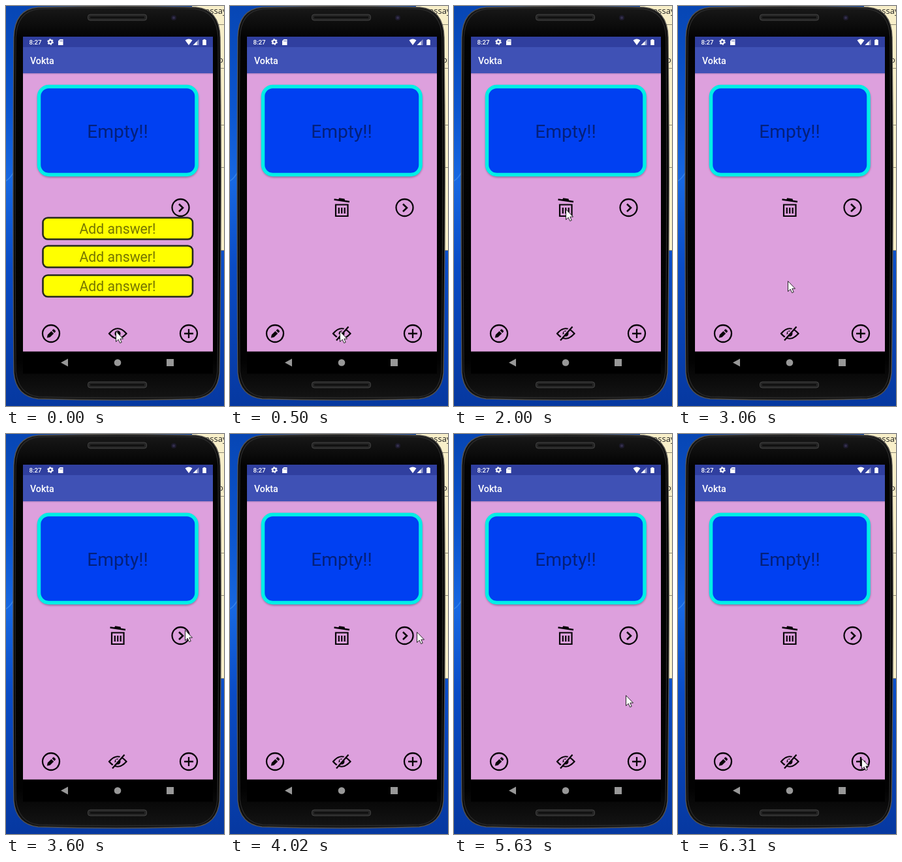
An HTML page for the animation above (8000 ms loop, 334x613 px).

```html
<!DOCTYPE html>
<html lang="en">
<head>
<meta charset="utf-8">
<title>Flashcard app</title>
<style>
  html, body { margin: 0; width: 100%; height: 100%; overflow: hidden; background: #0a4cc4; }
  svg { display: block; width: 100vw; height: 100vh; }
  text { font-family: Roboto, sans-serif; }
  .note { font: 13px "Open Sans", sans-serif; fill: #222; }
  .line { fill: none; stroke: #080408; stroke-width: 2.3; }
  .answer rect { fill: #ff0; stroke: #25291c; stroke-width: 2.6; }
  .answer text { font-size: 21.2px; fill: #757500; text-anchor: middle; }
</style>
</head>
<body>
<svg viewBox="0 0 334 613" xmlns="http://www.w3.org/2000/svg">
  <defs>
    <linearGradient id="desk" x1="0" y1="0" x2="0" y2="1">
      <stop offset="0" stop-color="#0746b4"/>
      <stop offset=".25" stop-color="#0b55cf"/>
      <stop offset=".44" stop-color="#1768e2"/>
      <stop offset=".65" stop-color="#0a4cc6"/>
      <stop offset="1" stop-color="#0638a0"/>
    </linearGradient>
    <linearGradient id="shell" x1="0" y1="0" x2="0" y2="1">
      <stop offset="0" stop-color="#191919"/>
      <stop offset=".08" stop-color="#030303"/>
      <stop offset=".9" stop-color="#020202"/>
      <stop offset="1" stop-color="#151515"/>
    </linearGradient>
    <filter id="soft" x="-10%" y="-10%" width="120%" height="120%"><feGaussianBlur stdDeviation="1.5"/></filter>
  </defs>

  <!-- desktop -->
  <rect width="334" height="613" fill="url(#desk)"/>
  <path d="M0 268Q7 264 13 252" fill="none" stroke="#4a97f2" stroke-width="1.5" opacity=".6"/>
  <rect x="285" width="49" height="375" fill="#f8efc9"/>
  <path d="M315 28.5H334M322 95.5H334M322 182.5H334M322 247.5H334M322 374.5H334" stroke="#8d8873"/>
  <rect x="326" y="184" width="4" height="62" fill="#b9b5a5"/>
  <text class="note" x="297" y="12">t essay</text>
  <text class="note" x="325" y="87">op</text>

  <!-- phone -->
  <path d="M49 2Q170 -1 291 2Q327 5 328 48Q331 306 327 562Q324 598 290 602Q170 606 49 602Q15 598 12 562Q10 306 12 48Q13 5 49 2Z" fill="url(#shell)" stroke="#55534f" stroke-width="1.4"/>
  <path d="M50 4.500Q170 2 290 4.500Q323 8 325 48Q327 306 324 560Q321 595 290 599Q170 602 50 599Q19 595 15 560Q13 306 15 48Q17 8 50 4.500Z" fill="none" stroke="#292929" stroke-width="1.3"/>
  <g fill="#252525" stroke="#454545">
    <rect x="125.500" y="13" width="90" height="9" rx="3.500"/>
    <rect x="125.500" y="576" width="90" height="9" rx="3.500"/>
  </g>
  <path d="M129 17.500H212M129 580.500H212" stroke="#111" stroke-width="3"/>
  <circle cx="257" cy="18" r="4" fill="#1c1a2b"/>
  <circle cx="257" cy="18" r="2" fill="#34304f"/>

  <!-- screen -->
  <rect x="26" y="47" width="291" height="483" fill="#dda0dd"/>
  <rect x="26" y="47" width="291" height="56" fill="#3f51b5"/>
  <rect x="26" y="47" width="291" height="16" fill="#303f9f"/>
  <rect x="26" y="103" width="291" height="1.500" fill="#8f70ad" opacity=".5"/>
  <g fill="#fff">
    <text x="35.500" y="59" font-size="9.700" font-weight="500">8:27</text>
    <text x="37" y="89" font-size="14.200" font-weight="500">Vokta</text>
    <circle cx="68" cy="55" r="2.700" fill="none" stroke="#fff" stroke-width="2"/>
    <circle cx="68" cy="55" r="4.200" fill="none" stroke="#fff" stroke-width="1.300" stroke-dasharray="2.200 2.198"/>
    <path d="M82.500 51H87.500V60H80V53.500Z"/>
    <path d="M82.800 52.500V54.500M84.400 52.500V54.500M86 52.500V54.500" stroke="#303f9f" stroke-width=".7"/>
    <path d="M274.500 52.500Q280 48.500 285.500 52.500L280 60Z"/>
    <path d="M295.500 51V60H286.500Z" opacity=".45"/>
    <path d="M292.500 54V60H286.500Z"/>
    <path d="M302.500 51H305.500V52H306.800V60H301.200V52H302.500Z"/>
  </g>

  <!-- card -->
  <rect x="48" y="122" width="247" height="141" rx="19" fill="#75507c" opacity=".65" filter="url(#soft)"/>
  <rect x="50.500" y="123.500" width="241.500" height="135" rx="15" fill="#0040f2" stroke="#00eee6" stroke-width="5.500"/>
  <text x="171" y="202" font-size="28.200" text-anchor="middle" fill="#04207a">Empty!!</text>

  <g id="answers"></g>

  <g id="trash" class="line">
    <path d="M159.500 296.500L183 300M167 297.500L168 295.500L174.500 296.500L175 298.500" stroke-width="2.500"/>
    <path d="M162 304.500H180.500V322H162ZM166.800 309V318M171.200 309V318M175.700 309V318" stroke-width="2.200"/>
  </g>

  <!-- round buttons -->
  <g class="line">
    <circle cx="267.500" cy="309" r="13"/>
    <path d="M265 303.500L271 309.200L265 315" stroke-width="2.600"/>
    <circle cx="69" cy="502" r="13"/>
    <circle cx="280" cy="502" r="13"/>
    <path d="M273 502H287M280 495V509"/>
  </g>
  <path d="M62.800 508.500L63.800 503.800L69.500 498.200L73.200 501.900L67.500 507.500ZM70.500 497.200L72.300 495.400Q73 495 73.600 495.600L75.800 497.800Q76.300 498.400 75.900 499.100L74.200 500.900Z" fill="#080408"/>

  <!-- eye -->
  <g class="line">
    <path d="M158 502Q171 486.500 184.500 502Q171 517.500 158 502Z" stroke-width="2.200"/>
    <circle cx="171" cy="502" r="4.500" fill="#080408" stroke="none"/>
    <circle cx="169.500" cy="500" r="1.500" fill="#dda0dd" stroke="none"/>
    <g id="slash">
      <path d="M161.500 511.500L180 490.500" stroke="#dda0dd" stroke-width="2.500"/>
      <path d="M163 512.500L181.500 491.500"/>
    </g>
  </g>

  <!-- navigation bar -->
  <rect x="26" y="529.500" width="291" height="34" fill="#000"/>
  <g fill="#989898">
    <path d="M84 546.500L95 540.500V552.500Z"/>
    <circle cx="171" cy="546.500" r="5.300"/>
    <rect x="246" y="541" width="11" height="11"/>
  </g>

  <path id="cursor" d="M.5 .7V16.500L4.200 13.100L6.700 18.500L9.200 17.400L6.800 12.100H11.500Z" fill="#fff" stroke="#111" stroke-width=".9"/>
</svg>
<script>
  const LOOP = 8000;
  const TOGGLE = 500;
  const byId = id => document.getElementById(id);

  // Pointer stops: [start ms, x, y]
  const stops = [
    [0, 168, 498],
    [1180, 164, 470], [1300, 154, 408], [1430, 168, 338], [1550, 193, 303],
    [1700, 142, 328], [1850, 164, 311], [2000, 171, 311],
    [3060, 168, 421], [3210, 169, 472], [3330, 171, 452], [3450, 172, 419],
    [3600, 274, 300], [3760, 307, 287],
    [3900, 286, 303], [4030, 269, 315], [4150, 265, 316], [4300, 265, 312], [4420, 265, 309],
    [5630, 263, 400], [5750, 261, 469], [5900, 262, 488], [6030, 266, 497],
    [6180, 274, 499], [6310, 281, 497]
  ];

  byId("answers").innerHTML = [324.5, 367.5, 412.5].map(y =>
    `<g class="answer"><rect x="56.500" y="${y}" width="229.500" height="33" rx="7.500"/>
     <text x="171" y="${y + 24.5}">Add answer!</text></g>`).join("");

  const show = (id, visible) => byId(id).setAttribute("visibility", visible ? "visible" : "hidden");

  function draw(t) {
    const hidden = t >= TOGGLE;
    show("answers", !hidden);
    show("trash", hidden);
    show("slash", hidden);
    const [, x, y] = stops.filter(stop => stop[0] <= t).pop();
    byId("cursor").setAttribute("transform", `translate(${x} ${y})`);
  }

  const start = performance.now();
  function tick() {
    draw((performance.now() - start) % LOOP);
    requestAnimationFrame(tick);
  }
  tick();
</script>
</body>
</html>
```
